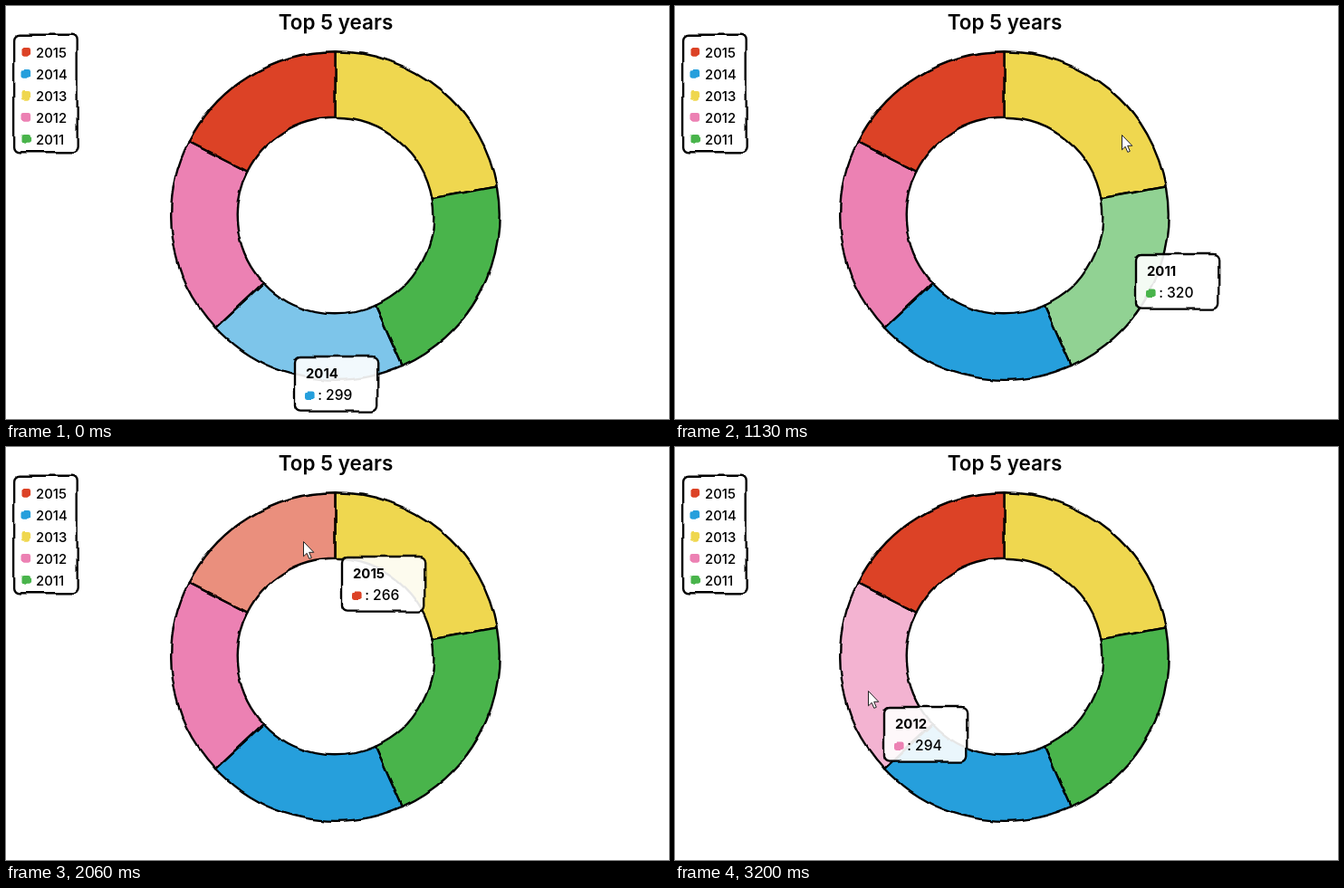
An HTML page that plays this animation: 732 px wide and 456 px high, repeating every 3270 ms.

```html
<!DOCTYPE html>
<html lang="en">
<head>
<meta charset="utf-8">
<title>Top 5 years</title>
<style>
  html, body { margin: 0; width: 100%; height: 100%; overflow: hidden; background: #fff; }
  svg { display: block; width: 732px; height: 456px; }
  text { font: 500 12.4px Inter, Lato, sans-serif; fill: #000; }
  .title { font-size: 22.5px; font-weight: 600; text-anchor: middle; }
  .head { font-weight: 700; }
  .value { font-size: 13px; }
  .line { stroke: #000; stroke-width: 2; }
  .wobble { filter: url(#wobble); }
</style>
</head>
<body>
<svg id="stage" viewBox="0 0 732 456" xmlns="http://www.w3.org/2000/svg">
  <defs>
    <filter id="wobble" filterUnits="userSpaceOnUse" x="-170" y="-170" width="340" height="340">
      <feTurbulence type="fractalNoise" baseFrequency="0.05" result="noise"/>
      <feDisplacementMap scale="5" xChannelSelector="R" yChannelSelector="G" in="SourceGraphic" in2="noise"/>
    </filter>
  </defs>
  <text class="title" x="364" y="25.5">Top 5 years</text>
</svg>
<script>
const LOOP = 3270, STEP = 200 / 3, SCALE = 1.2, TURN = 2 * Math.PI;
const CENTER = { x: 363.5, y: 231.5 };
const OUTER = 151, INNER = OUTER * 0.6;
const TIP_GAP = 18, POINTER_FROM = 12;

const years = [
  { year: 2015, value: 266, color: '#dc4325' },
  { year: 2014, value: 299, color: '#259fdc' },
  { year: 2013, value: 336, color: '#efd750' },
  { year: 2012, value: 294, color: '#ec81b3' },
  { year: 2011, value: 320, color: '#48b44c' }
];

// Turning points of the pointer
const route = [
  { step: 0, x: 301, y: 369 },
  { step: 6, x: 486, y: 336 },
  { step: 16, x: 491, y: 256 },
  { step: 17, x: 493, y: 142 },
  { step: 22, x: 478, y: 123 },
  { step: 24, x: 478, y: 123 },
  { step: 30, x: 353, y: 103 },
  { step: 31, x: 328, y: 104 },
  { step: 37, x: 325, y: 105 },
  { step: 38, x: 281, y: 129 },
  { step: 46, x: 213, y: 269 }
];

const stage = document.getElementById('stage');

function add(parent, name, attrs, text) {
  const el = document.createElementNS('http://www.w3.org/2000/svg', name);
  for (const key in attrs) el.setAttribute(key, attrs[key]);
  if (text) el.textContent = text;
  return parent.appendChild(el);
}

function place(el, x, y, scale = SCALE) {
  el.setAttribute('transform', `translate(${x} ${y}) scale(${scale})`);
}

function group(x, y) {
  const g = add(stage, 'g');
  place(g, x, y);
  return g;
}

function panel(parent, x, y, width, height) {
  add(parent, 'rect', {
    class: 'line wobble', x, y, width, height, rx: 5, fill: '#fff', 'fill-opacity': 0.9
  });
}

function swatch(parent, y, fill) {
  return add(parent, 'rect', { class: 'wobble', x: 15, y, width: 8, height: 8, rx: 2, fill });
}

function wedge(a, b) {
  const at = (r, t) => `${r * Math.sin(t)} ${-r * Math.cos(t)}`;
  return `M${at(OUTER, a)}A${OUTER} ${OUTER} 0 0 1 ${at(OUTER, b)}` +
    `L${at(INNER, b)}A${INNER} ${INNER} 0 0 0 ${at(INNER, a)}Z`;
}

// Ring, largest value first, clockwise from the top
const ring = group(CENTER.x, CENTER.y);
const total = years.reduce((sum, d) => sum + d.value, 0);
let angle = 0;
for (const d of [...years].sort((a, b) => b.value - a.value)) {
  d.from = angle;
  d.to = angle += d.value / total * TURN;
  d.path = add(ring, 'path', { class: 'line wobble', d: wedge(d.from, d.to), fill: d.color });
}

const legend = group(-0.5, 25.7);
panel(legend, 8, 5, 58, 108);
years.forEach((d, i) => {
  swatch(legend, 17 + 20 * i, d.color);
  add(legend, 'text', { x: 28, y: 25.8 + 20 * i }, String(d.year));
});

const tip = group(0, 0);
panel(tip, 5, 5, 76, 50.5);
const tipHead = add(tip, 'text', { class: 'head', x: 15, y: 25 });
const tipSwatch = swatch(tip, 37, '#000');
const tipValue = add(tip, 'text', { class: 'value', x: 26, y: 45.4 });

const pointer = add(stage, 'path', {
  d: 'M.5.5V16.8L4.2 13.3 6.8 19.4 9.3 18.3 6.7 12.3H11.8Z',
  fill: '#fff', stroke: '#222'
});

function pointerAt(step) {
  const i = route.findIndex(p => p.step > step);
  if (i < 0) return route[route.length - 1];
  const a = route[i - 1], b = route[i];
  const k = (step - a.step) / (b.step - a.step);
  const mix = key => Math.round(a[key] + (b[key] - a[key]) * k);
  return { x: mix('x'), y: mix('y') };
}

function yearUnder({ x, y }) {
  const t = (Math.atan2(x - CENTER.x, CENTER.y - y) + TURN) % TURN;
  return years.find(d => t >= d.from && t < d.to);
}

function draw(step) {
  const now = pointerAt(step);
  pointer.setAttribute('visibility', step < POINTER_FROM ? 'hidden' : 'visible');
  place(pointer, now.x, now.y, 1);

  // Hover and tooltip trail the pointer by one step
  const past = pointerAt(Math.max(0, step - 1));
  const hit = yearUnder(past);
  for (const d of years) d.path.setAttribute('fill-opacity', d === hit ? 0.6 : 1);
  tipHead.textContent = hit.year;
  tipValue.textContent = ': ' + hit.value;
  tipSwatch.setAttribute('fill', hit.color);
  place(tip, past.x + TIP_GAP - 6, past.y + TIP_GAP - 6);
}

const start = performance.now();
let shown = -1;
function tick() {
  const time = (performance.now() - start) % LOOP;
  const step = Math.floor((time + 7) / STEP);
  if (step !== shown) draw(shown = step);
  requestAnimationFrame(tick);
}
tick();
</script>
</body>
</html>
```
